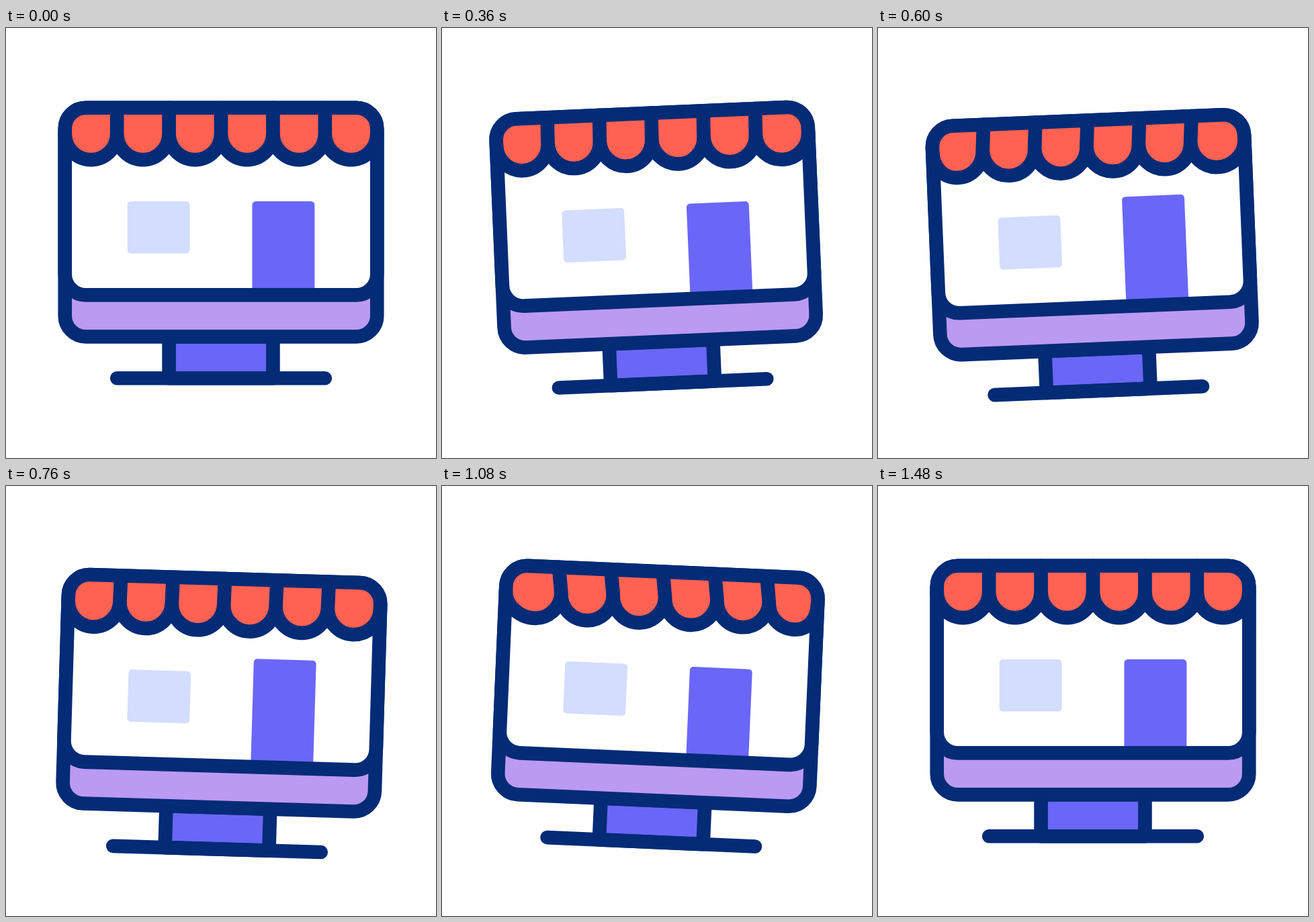
Write an HTML page with a canvas that moves like this. It is 640 by 640 pixels and loops after 1640 ms.

```html
<!DOCTYPE html>
<html lang="en">
<head>
<meta charset="utf-8">
<title>Online shop</title>
<style>
  html, body { margin: 0; height: 100%; overflow: hidden; background: #fff; }
  canvas { display: block; width: 640px; height: 640px; }
</style>
</head>
<body>
<canvas id="stage" width="640" height="640"></canvas>
<script>
const ctx = document.getElementById('stage').getContext('2d');
const LOOP = 1640, STEP = 40, UNIT = 640 / 62;
const NAVY = '#032b76', CORAL = '#ff6152', LILAC = '#bb9af1',
      INDIGO = '#6a66f8', PALE = '#d3ddfd';

// Equivalent of cubic-bezier(.4, 0, 0, 1)
function snap(x) {
  let lo = 0, hi = 1;
  for (let i = 0; i < 24; i++) {
    const s = (lo + hi) / 2;
    if (1.2 * s * (1 - s) ** 2 + s ** 3 < x) lo = s; else hi = s;
  }
  return lo * lo * (3 - 2 * lo);
}
const sine = x => (1 - Math.cos(Math.PI * x)) / 2;

// keys: [time, value] pairs
function track(t, ease, ...keys) {
  if (t <= keys[0][0]) return keys[0][1];
  for (let i = 1; i < keys.length; i++) {
    const [t0, a] = keys[i - 1], [t1, b] = keys[i];
    if (t < t1) return a + (b - a) * ease((t - t0) / (t1 - t0));
  }
  return keys[keys.length - 1][1];
}

function box(x, y, w, h, radius, fill, outlined) {
  ctx.beginPath();
  ctx.roundRect(x, y, w, h, radius);
  if (fill) { ctx.fillStyle = fill; ctx.fill(); }
  if (outlined) ctx.stroke();
}

// Six scallops; the outer ends stay fixed to the frame while the rest sway
function scallops(path, sway) {
  const k = 2.07, top = -15.75, bottom = -12;
  for (let i = 0; i < 6; i++) {
    const left = -22.5 + 7.5 * i + (i > 0 ? sway : 0);
    const mid = -18.75 + 7.5 * i + sway;
    const right = -15 + 7.5 * i + (i < 5 ? sway : 0);
    path.bezierCurveTo(left, top + k, mid - k, bottom, mid, bottom);
    path.bezierCurveTo(mid + k, bottom, right, top + k, right, top);
  }
}

function awning(sway) {
  const cloth = new Path2D('M19.5 -19.5H-19.5A3 3 0 0 0 -22.5 -16.5V-15.75');
  scallops(cloth, sway);
  cloth.lineTo(22.5, -16.5);
  cloth.arc(19.5, -16.5, 3, 0, -Math.PI / 2, true);
  ctx.fillStyle = CORAL;
  ctx.fill(cloth);

  const seams = new Path2D('M-22.5 -15.75');
  scallops(seams, sway);
  for (let x = -15; x <= 15; x += 7.5) {
    seams.moveTo(x, -19.5);
    seams.lineTo(x + sway, -15.75);
  }
  ctx.stroke(seams);
}

function draw(t) {
  const angle = track(t, snap, [60, 0], [540, -2.62], [1020, 2.62], [1500, 0]);
  const drop = track(t, snap, [60, 0], [540, 7.2], [1020, 9.2], [1500, 0]);
  const bounce = track(t, snap, [300, 0], [695, 1], [1095, 0]);
  const sway = track(t, sine, [220, 0], [600, -0.28], [1050, 0.5], [1480, 0]);

  ctx.setTransform(1, 0, 0, 1, 0, 0);
  ctx.fillStyle = '#fff';
  ctx.fillRect(0, 0, 640, 640);
  ctx.translate(320, 320 + drop + 11.6 * bounce);
  ctx.rotate(angle * Math.PI / 180);
  ctx.scale(UNIT, UNIT);
  ctx.strokeStyle = NAVY;
  ctx.lineWidth = 2;
  ctx.lineCap = ctx.lineJoin = 'round';

  box(-7.5, 13.5, 15, 6, 0, INDIGO, true);
  ctx.beginPath();
  ctx.moveTo(-15, 19.5);
  ctx.lineTo(15, 19.5);
  ctx.stroke();

  box(-22.5, -19.5, 45, 33, 3, LILAC, true);
  box(-22.5, -19.5, 45, 27, 3, '#fff');
  box(-13.5, -6, 9, 7.5, 0.5, PALE);
  const rise = 2.33 * bounce;
  box(4.5, -6 - rise, 9, 13 + rise, [0.5, 0.5, 0, 0], INDIGO);
  awning(sway);
  box(-22.5, -19.5, 45, 27, 3, null, true);
}

function tick() {
  const t = performance.now() % LOOP;
  draw(Math.floor(t / STEP) * STEP);
  requestAnimationFrame(tick);
}
tick();
</script>
</body>
</html>
```
